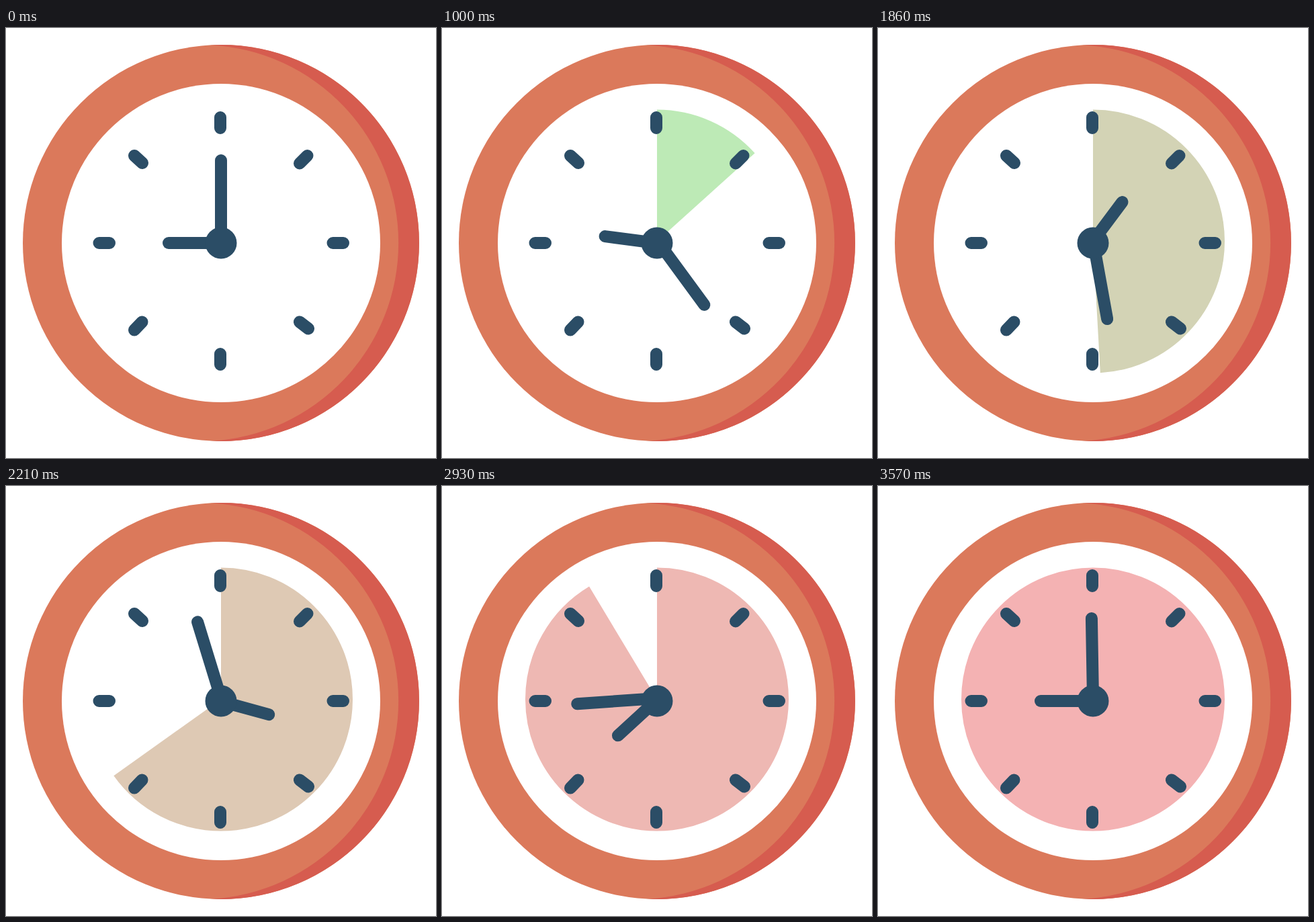
Write an HTML page that moves like this. It is 640 px wide and 640 px high and loops after 3870 ms.

```html
<!DOCTYPE html>
<html lang="en">
<head>
<meta charset="utf-8">
<title>Clock</title>
<style>
  html, body { margin: 0; height: 100%; overflow: hidden; background: #fff; }
  svg { display: block; width: 100vw; height: 100vh; }
  .ink { fill: none; stroke: #2b4d66; stroke-width: 18; stroke-linecap: round; }
</style>
</head>
<body>
<svg viewBox="0 0 640 640">
  <circle cx="320" cy="320" r="295" fill="#db795b"/>
  <path fill="#d65c4f" d="M304.5 25.4A295 295 0 0 1 304.5 614.6A295 295 0 1 0 304.5 25.4"/>
  <circle cx="320" cy="320" r="237" fill="#fff"/>
  <circle id="sector" cx="320" cy="317.5" r="98" fill="none" stroke-width="196"
    pathLength="360" transform="rotate(-90 320 317.5)"/>
  <path class="ink" d="M319 133V149M319 485V501M138.500 320H154M486.500 320H502
    M191 190L203 201M437 201.500L448.500 190M191 449.500L202.500 437.500M437 437.500L450 447.500"/>
  <path class="ink" id="hour" d="M242 320H320"/>
  <path class="ink" id="minute" d="M320 197V316"/>
  <circle cx="320" cy="320" r="23.5" fill="#2b4d66"/>
</svg>
<script>
  const LOOP = 3870, FPS = 14, COMP_FPS = 25, END = 89;
  const [sector, hour, minute] = ['sector', 'hour', 'minute'].map(id => document.getElementById(id));

  // Eased progress between a start position and END on the 25 fps timeline
  function progress(pos, start) {
    const p = Math.min(1, Math.max(0, (pos - start) / (END - start)));
    return p * p * (3 - 2 * p);
  }

  const mix = (a, b, s) => Math.round(a + (b - a) * s);

  function draw(ms) {
    // The picture advances in 14 fps steps, timed to whole centiseconds
    const step = Math.ceil((Math.floor(ms / 10) + 0.5) * FPS / 100) - 1;
    const pos = Math.ceil(step * COMP_FPS / FPS);
    const s = progress(pos, 6);
    const h = progress(pos, 19);

    sector.setAttribute('stroke', s > 0 ? `rgb(${mix(180, 244, s)},${mix(243, 178, s)},${mix(182, 179, s)})` : 'none');
    sector.setAttribute('stroke-dasharray', s < 1 ? `${360 * s} 360` : 'none');
    minute.setAttribute('transform', `rotate(${1079 * s} 320 316)`);
    hour.setAttribute('transform', `rotate(${360 * h} 318 320)`);
  }

  const start = performance.now();
  function tick() {
    draw((performance.now() - start) % LOOP);
    requestAnimationFrame(tick);
  }
  tick();
</script>
</body>
</html>
```
